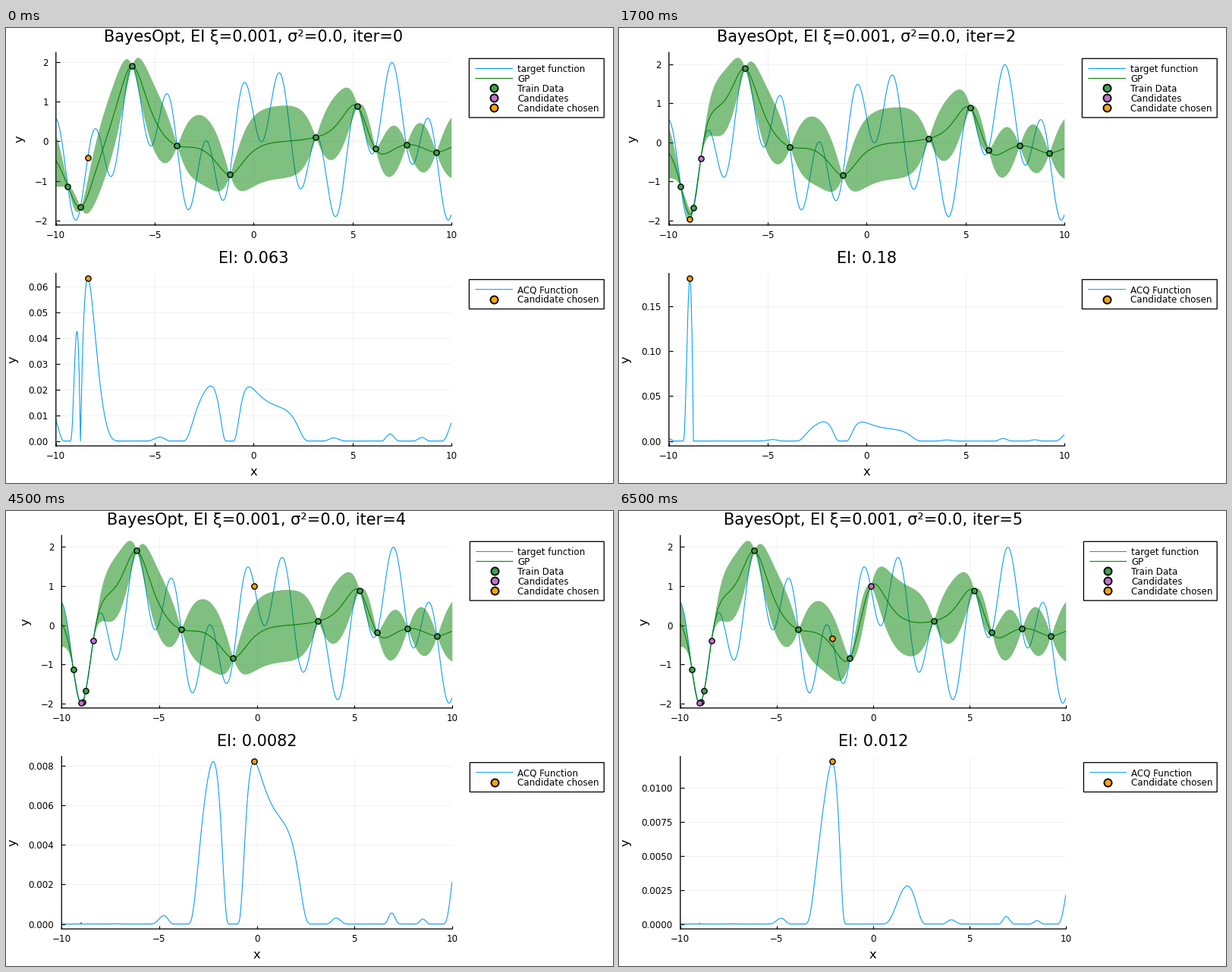
A matplotlib script for the animation above (8 s loop, 800 by 600 pixels).

```python
import math

import matplotlib.pyplot as plt
import numpy as np
from matplotlib.animation import FuncAnimation
from matplotlib.patches import Rectangle

W, H = 800, 600
PX = 0.72  # points per pixel at 100 dpi
BLUE, GREEN, ORANGE = "#009AFA", "#008000", "#FFA500"
TRAIN_COLOR, CANDIDATE_COLOR = "#3DA44D", "#C271D2"
TICK_SIZE, LABEL_SIZE, TITLE_SIZE = 11.9 * PX, 16.37 * PX, 20.83 * PX

LENGTH_SCALE, VARIANCE, XI = 0.816, 0.854, 0.001
TRAIN_X = np.array([-9.398, -8.76, -6.157, -3.874, -1.207,
                    3.14, 5.252, 6.158, 7.727, 9.229])
CANDIDATE_X = np.array([-8.387, -8.942, -9.002, -0.125, -2.126])
# peak of the acquisition function, tick step, tick decimals
ACQ_AXES = [(0.0633, 0.01, 2), (0.1808, 0.05, 2), (0.01083, 0.0025, 4),
            (0.00822, 0.002, 3), (0.01197, 0.0025, 4)]
GRID = np.linspace(-10, 10, 2001)

plt.rcParams["font.family"] = "DejaVu Sans"
fig = plt.figure(figsize=(W / 100, H / 100), dpi=100, facecolor="white")
top, bottom = fig.add_axes([0, 0, 1, 1]), fig.add_axes([0, 0, 1, 1])
stage = fig.add_axes([0, 0, 1, 1], zorder=5)
erf = np.vectorize(math.erf)


def target(x):
    return np.sin(x + 1) + np.sin(10 / 3 * (x + 1))


def matern52(a, b):
    s = math.sqrt(5) * np.abs(a[:, None] - b[None, :]) / LENGTH_SCALE
    return VARIANCE * (1 + s + s * s / 3) * np.exp(-s)


def posterior(x):
    """Mean and standard deviation of the Gaussian process on GRID."""
    gram = matern52(x, x) + 1e-10 * np.eye(len(x))
    cross = matern52(x, GRID)
    weights = np.linalg.solve(gram, cross)
    variance = VARIANCE - (cross * weights).sum(axis=0)
    return weights.T @ target(x), np.sqrt(np.maximum(variance, 1e-12))


def expected_improvement(mean, sd, best):
    gain = best - mean - XI
    z = gain / sd
    pdf = np.exp(-z * z / 2) / math.sqrt(2 * math.pi)
    cdf = (1 + erf(z / math.sqrt(2))) / 2
    return np.maximum(gain * cdf + sd * pdf, 0)


def style_panel(ax, box, ylim, yticks, decimals):
    left, right, upper, lower = box
    ax.clear()
    ax.set_position([left / W, 1 - lower / H,
                     (right - left) / W, (lower - upper) / H])
    ax.set_xlim(-10, 10)
    ax.set_ylim(*ylim)
    ax.set_xticks(range(-10, 11, 5))
    ax.set_yticks(yticks)
    ax.yaxis.set_major_formatter(
        lambda v, _: f"{v:.{decimals}f}".replace("-", "\u2212"))
    ax.tick_params(direction="in", length=4.5 * PX, width=1.2 * PX,
                   labelsize=TICK_SIZE)
    ax.tick_params(axis="x", pad=7.1 * PX)
    ax.tick_params(axis="y", pad=10 * PX)
    ax.grid(color="black", alpha=0.08, linewidth=0.7 * PX)
    ax.set_axisbelow(True)
    ax.spines[["top", "right"]].set_visible(False)
    ax.spines[["left", "bottom"]].set(linewidth=1.3 * PX, snap=False)


def curve(ax, x, y, color):
    ax.plot(x, y, color=color, lw=1.05 * PX, snap=False, zorder=2)


def dots(ax, x, y, color, size=7.2, edge=1.4):
    ax.plot(x, y, "o", color=color, ms=size * PX, mec="black",
            mew=edge * PX, snap=False, clip_on=False, zorder=4)


def label(x, y, text, size, **kwargs):
    kwargs = {"ha": "center", "va": "baseline", **kwargs}
    stage.text(x, y, text, fontsize=size, rotation_mode="anchor", **kwargs)


def legend(left, upper, lower, first_row, entries):
    stage.add_patch(Rectangle((left, upper), 788.2 - left, lower - upper,
                              fc="white", ec="black", lw=1.3 * PX,
                              snap=False))
    shift = (left - 610.5) / 2
    for i, (text, color, is_line) in enumerate(entries):
        y = first_row + 12.9 * i
        if is_line:
            curve(stage, [left + 8.5, 667.5 + shift], [y, y], color)
        else:
            dots(stage, 643.2 + shift, y, color, size=10, edge=1.9)
        label(674 + shift, y + 4.4, text, TICK_SIZE, ha="left")


def draw(n):
    step = (n + 3) // 4
    peak, tick, decimals = ACQ_AXES[step]
    left, right = 50.8 + 7.5 * decimals, 584.8 + decimals
    center = (left + right) / 2

    seen, chosen = CANDIDATE_X[:step], CANDIDATE_X[step]
    known = np.concatenate([TRAIN_X, seen])
    mean, sd = posterior(known)
    acq = expected_improvement(mean, sd, target(known).min())
    truth = target(GRID)

    low = min(truth.min(), (mean - sd).min())
    high = max(truth.max(), (mean + sd).max())
    pad = 0.03 * (high - low)
    style_panel(top, (left, right, 32.3, 259.8), (low - pad, high + pad),
                range(-2, 3), 0)
    curve(top, GRID, truth, BLUE)
    top.fill_between(GRID, mean - sd, mean + sd, color=GREEN, alpha=0.5,
                     lw=0, zorder=2)
    curve(top, GRID, mean, GREEN)
    dots(top, TRAIN_X, target(TRAIN_X), TRAIN_COLOR)
    dots(top, seen, target(seen), CANDIDATE_COLOR)
    dots(top, chosen, target(chosen), ORANGE)

    style_panel(bottom, (left, right, 323.6, 551.1),
                (-0.03 * peak, 1.03 * peak),
                np.arange(0, peak, tick), decimals)
    curve(bottom, GRID, acq, BLUE)
    dots(bottom, chosen, peak, ORANGE)

    stage.clear()
    stage.set(xlim=(0, W), ylim=(H, 0))
    stage.axis("off")
    iteration = step + (step > 0)
    label(center, 18.3, f"BayesOpt, EI ξ=0.001, σ²=0.0, iter={iteration}",
          TITLE_SIZE)
    label(center, 309.8, f"EI: {peak:.2g}", TITLE_SIZE)
    label(left - 43, 146, "y", LABEL_SIZE, rotation=90)
    label(13.5, 437.3, "y", LABEL_SIZE, rotation=90)
    label(center, 590.3, "x", LABEL_SIZE)
    legend(608.4 + decimals, 40.3, 118.1, 53.5, [
        ("target function", BLUE, True),
        ("GP", GREEN, True),
        ("Train Data", TRAIN_COLOR, False),
        ("Candidates", CANDIDATE_COLOR, False),
        ("Candidate chosen", ORANGE, False)])
    legend(608.4 + decimals, 331.7, 370.5, 344.7, [
        ("ACQ Function", BLUE, True),
        ("Candidate chosen", ORANGE, False)])
    return []


anim = FuncAnimation(fig, draw, frames=16, interval=500, repeat=True,
                     repeat_delay=0, blit=False)
plt.show()
```
